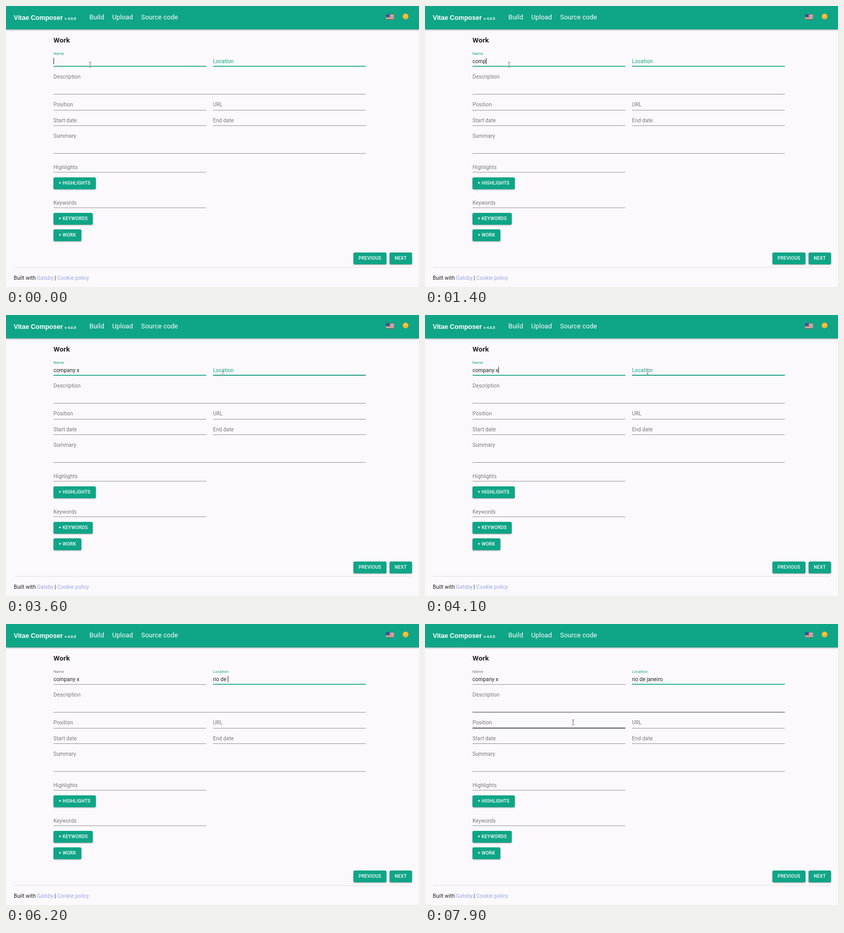
Recreate the animation shown at these times as an HTML page. Size 800 by 546 pixels, loop 8 s.

```html
<!DOCTYPE html>
<html lang="en">
<head>
<meta charset="utf-8">
<title>Work form</title>
<style>
  html, body { margin: 0; width: 100%; height: 100%; overflow: hidden; background: #fbf9fc; }
  svg { display: block; font: 10.16px Roboto, sans-serif; letter-spacing: .0094em; }
  text { white-space: pre; fill: #212121; }
  .title { font-size: 13.5px; font-weight: 700; }
  .brand { font: 700 12.7px "Liberation Sans", Arial, sans-serif; letter-spacing: -.1px; fill: #fff; }
  .version { font-size: 7.6px; letter-spacing: -.15px; }
  .nav { font-size: 12.7px; fill: #fff; }
  .label { fill: #777; }
  .link { fill: #98a4e6; }
  .button { font-size: 8.9px; font-weight: 500; letter-spacing: .0286em; fill: #fff; }
  .bar { filter: drop-shadow(0 1.5px 1.5px #0005); }
  .raised { filter: drop-shadow(0 1px 1px #0005); }
</style>
</head>
<body>
<svg id="stage" width="800" height="546" viewBox="0 0 800 546"></svg>
<script>
const GREEN = '#0fa587', GREY = '#777777';
const stage = document.getElementById('stage');
const clamp = v => Math.max(0, Math.min(1, v));
const ease = v => { v = clamp(v); return v * v * (3 - 2 * v); };
const rect = (x, y, w, h, fill, extra = '') =>
  `<rect x="${x}" y="${y}" width="${w}" height="${h}" fill="${fill}" ${extra}/>`;
const text = (x, y, cls, str, extra = '') =>
  `<text x="${x}" y="${y}" class="${cls}" ${extra}>${str}</text>`;
const button = (x, y, w, str) =>
  rect(x, y, w, 23, GREEN, 'rx="2.5" class="raised"') + text(x + 10, y + 14.4, 'button', str);
const field = (id, x, base, line, w, str) =>
  rect(x, line, w, 1, '#959497') +
  `<rect id="${id}Hover" x="${x}" y="${line - .4}" width="${w}" height="1.4" fill="#222" opacity="0"/>` +
  text(x, base, 'label', str, `id="${id}Label"`);
// Typed value, caret and focus underline of an editable field
const editable = (id, x) =>
  text(x, 110.7, 'value', '', `id="${id}Value"`) +
  rect(x, 101, 1, 12, '#222', `id="${id}Caret"`) +
  rect(x, 116.4, 296, 1.6, GREEN, `id="${id}Focus"`);

const flag = () => {
  let s = '';
  for (let i = 0; i < 7; i++) s += rect(736, 16 + i * 1.45, 15.5, 1.45, i % 2 ? '#f4eeee' : '#d0524f');
  return s + rect(736, 16, 7.5, 5.6, '#3d4f91');
};
const sun = () => {
  let rays = '';
  for (let i = 0; i < 24; i++) {
    const a = i * Math.PI / 12, r = i % 2 ? 4.9 : 6.5;
    rays += `${774 + r * Math.sin(a)},${20.3 - r * Math.cos(a)} `;
  }
  return `<polygon points="${rays}" fill="#f5a52c"/><circle cx="774" cy="20.3" r="4.5" fill="#fccb3d"/>
    <path d="M772 19v.8M776 19v.8M771.8 21.8q2.2 2 4.4 0" fill="none" stroke="#a9692a" stroke-width=".8"/>`;
};
const beam = 'M-2-5Q0-5 0-4V4Q0 5-2 5M2-5Q0-5 0-4M2 5Q0 5 0 4';

stage.innerHTML =
  rect(0, 0, 800, 45.5, GREEN, 'class="bar"') +
  text(15, 27, 'brand', 'Vitae Composer') + text(113.5, 27, 'brand version', 'v 4.0.5') +
  text(161.5, 26, 'nav', 'Build') + text(205.8, 26, 'nav', 'Upload') + text(261.8, 26, 'nav', 'Source code') +
  flag() + sun() +
  text(92, 71, 'title', 'Work') +
  field('name', 92, 110.7, 117, 296, 'Name') +
  field('location', 401, 110.7, 117, 296, 'Location') +
  field('description', 92, 141.2, 171, 605, 'Description') +
  field('position', 92, 195.3, 202, 296, 'Position') +
  field('url', 401, 195.3, 202, 296, 'URL') +
  field('start', 92, 225.8, 232, 296, 'Start date') +
  field('end', 401, 225.8, 232, 296, 'End date') +
  field('summary', 92, 256.3, 286, 605, 'Summary') +
  field('highlights', 92, 316.7, 322.5, 296, 'Highlights') +
  field('keywords', 92, 385.6, 391.5, 296, 'Keywords') +
  editable('name', 92) + editable('location', 401) +
  button(92, 333, 82, '+ HIGHLIGHTS') + button(92, 402, 76, '+ KEYWORDS') + button(92, 434, 54, '+ WORK') +
  button(673, 479, 64, 'PREVIOUS') + button(743, 479, 43.5, 'NEXT') +
  rect(15, 507.5, 770, 1, '#e2e0e3') +
  text(15, 532, '', 'Built with') + text(60, 532, 'link', 'Gatsby') +
  text(94, 532, '', '|') + text(99.5, 532, 'link', 'Cookie policy') +
  `<g id="pointer" fill="none"><path d="${beam}" stroke="#fff" stroke-width="2"/>
   <path d="${beam}" stroke="#555" stroke-width=".9"/></g>`;

const get = id => document.getElementById(id);
const LOOP = 8000, CLICK = 4200;
const inputs = [
  { id: 'name', x: 92, str: 'company x', from: -1000, to: CLICK,
    keys: [700, 900, 1100, 1300, 1550, 1800, 2000, 2500, 2700] },
  { id: 'location', x: 401, str: 'rio de janeiro', from: CLICK, to: LOOP + 1000,
    keys: [5200, 5350, 5500, 5650, 5850, 6000, 6150, 6500, 6650, 6800, 6950, 7100, 7200, 7350] },
];
const hovers = [['location', 3500, CLICK], ['description', 7750, 7790], ['position', 7850, LOOP]];
// Pointer stops: time, x, y
const stops = [[0, 163, 114], [3200, 163, 114], [3500, 412, 113], [3600, 420, 113], [4000, 431, 110],
  [7700, 431, 110], [7800, 340, 150], [7900, 287, 191]];
const hidden = [[1500, 3200], [5200, 7800]];

const mix = k => `color-mix(in srgb, ${GREEN} ${k * 100}%, ${GREY})`;

function drawInput({ id, x, str, from, to, keys }, t) {
  const typed = keys.filter(k => k <= t);
  const active = t >= from && t < to;
  const focus = ease((t - from) / 200);
  const colour = active ? focus : 1 - ease((t - to) / 200);
  const value = get(id + 'Value'), caret = get(id + 'Caret'), line = get(id + 'Focus'), label = get(id + 'Label');

  value.textContent = str.slice(0, typed.length);
  const width = typed.length ? value.getComputedTextLength() : 0;
  const since = t - (typed.length ? typed[typed.length - 1] : Math.max(0, from));
  caret.setAttribute('x', x + width);
  caret.setAttribute('opacity', active && since % 1000 < 500 ? 1 : 0);

  const grown = 296 * (active ? focus : colour);
  line.setAttribute('x', x + (296 - grown) / 2);
  line.setAttribute('width', grown);

  label.setAttribute('y', 110.7 - 16.2 * focus);
  label.style.fontSize = 10.16 * (1 - .25 * focus) + 'px';
  label.style.fill = mix(colour);
}

function drawPointer(t) {
  let i = 0;
  while (i < stops.length - 2 && stops[i + 1][0] <= t) i++;
  const [t0, x0, y0] = stops[i], [t1, x1, y1] = stops[i + 1];
  const k = clamp((t - t0) / (t1 - t0));
  const pointer = get('pointer');
  pointer.setAttribute('transform', `translate(${x0 + (x1 - x0) * k} ${y0 + (y1 - y0) * k})`);
  pointer.setAttribute('opacity', hidden.some(([a, b]) => t >= a && t < b) ? 0 : 1);
}

function draw(now) {
  const t = Math.floor(now % LOOP / 100) * 100;
  inputs.forEach(input => drawInput(input, t));
  for (const [id, from, to] of hovers)
    get(id + 'Hover').setAttribute('opacity', t < from ? 0 : 1 - clamp((t - to) / 200));
  drawPointer(t);
}

let start;
function tick(now) {
  start ??= now;
  draw(now - start);
  requestAnimationFrame(tick);
}
draw(0);
requestAnimationFrame(tick);
</script>
</body>
</html>
```
